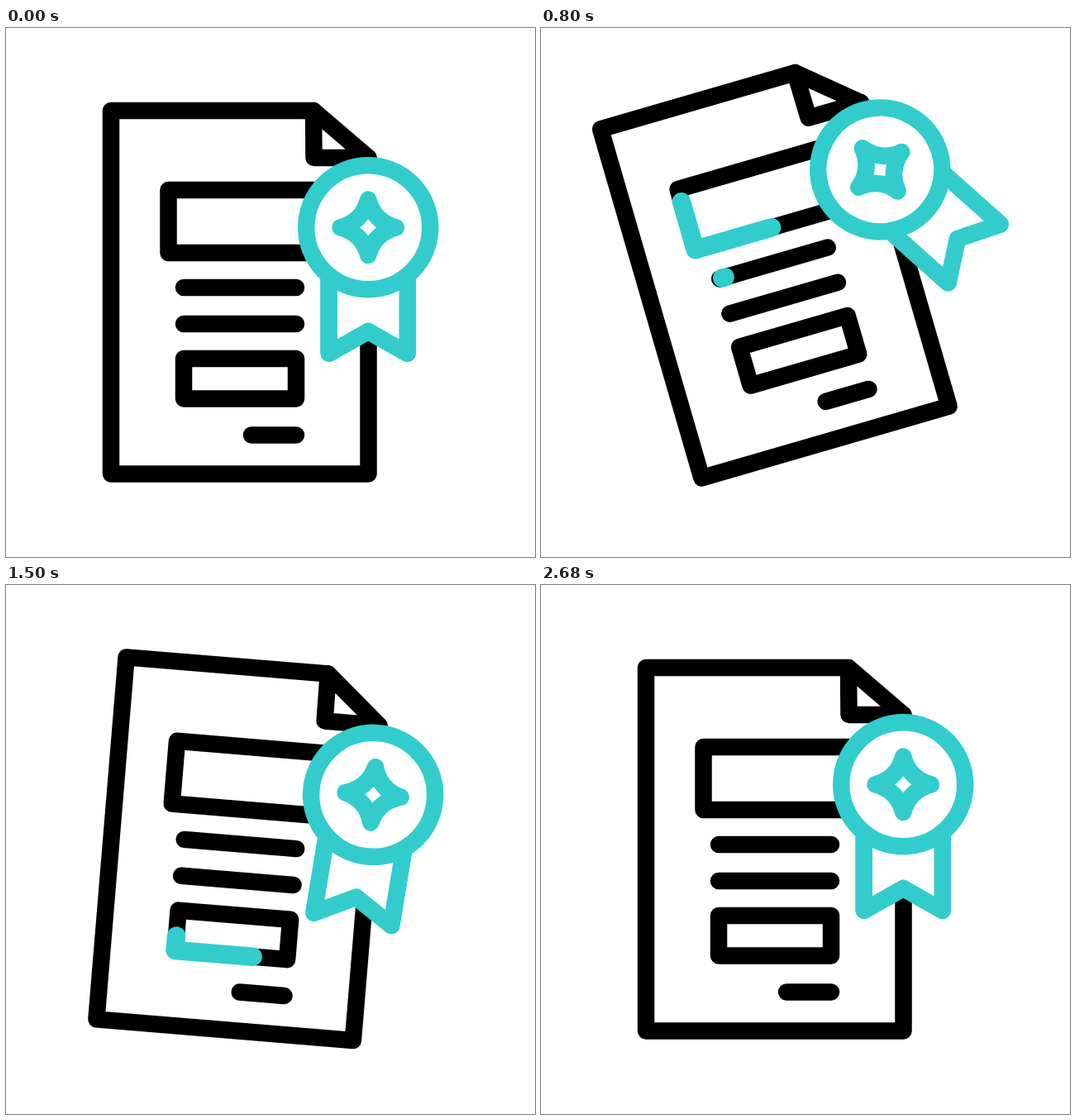
Animation, 640 px wide and 640 px high, one loop 2.82 s. Source, as an HTML page with a canvas:

```html
<!DOCTYPE html>
<html lang="en">
<head>
<meta charset="utf-8">
<title>Certificate</title>
<style>
  html, body { margin: 0; width: 100%; height: 100%; overflow: hidden; background: #fff; }
  canvas { display: block; width: 640px; height: 640px; }
</style>
</head>
<body>
<canvas id="stage" width="640" height="640"></canvas>
<script>
const ctx = document.getElementById('stage').getContext('2d');
const LOOP = 2820;
const REST = 2680;
const TEAL = '#33cccc';
const STROKE = 20.5;
const CENTER = { x: 282.5, y: 319.5 };
const MEDAL = { x: 438.2, y: 241.3 };

const progress = (t, from, span) => Math.min(1, Math.max(0, (t - from) / span));
const ease = s => s * s * (3 - 2 * s);

// Eases from rest to the first peak, then on to one further peak per beat, then to rest.
function swing(start, first, beat, ...peaks) {
  return t => [...peaks, 0].reduce((value, peak, i) => {
    const from = i ? first + (i - 1) * beat : start;
    const span = i ? beat : first - start;
    return value + (peak - (peaks[i - 1] || 0)) * ease(progress(t, from, span));
  }, 0);
}

const pageLift = swing(28, 690, 512, -39, 38.5, -24);
const pageTilt = swing(84, 820, 488, -16.2, 10.6, -6.4, 3.15);
const ribbonSwing = swing(165, 805, 465, -32.1, 13.2, -4.1);
const starTurn = swing(110, 800, 360, -23.3, 12.4);

// Boxes run from the top right, leftwards, down and back along the bottom.
const box = (left, top, right, bottom) =>
  [[right, top], [left, top], [left, bottom], [right, bottom]];
const row = (left, right, y) => [[left, y], [right, y]];

const fold = [[372, 100], [438.5, 157], [372.5, 157]];
const page = [...box(127, 100, 438.5, 539.5), fold[1], fold[0]];
const titleBox = box(196.5, 196, 372, 272);
const lowerBox = box(215, 400, 351, 448.5);
const lineOne = row(215, 351, 314);
const lineTwo = row(215, 351, 358);
const lineThree = row(297, 351, 492.5);
page[0] = fold[0];
page.pop();

// Each highlight has an even head and a tail that speeds up behind it.
const highlight = (points, start, headSpan, tailSpan) => ({ points, start, headSpan, tailSpan });
const lineHighlight = (points, start) => highlight(points, start, 220, 400);
const highlights = [
  highlight(titleBox, 75, 830, 1085),
  lineHighlight(lineOne, 740),
  lineHighlight(lineTwo, 887),
  highlight([...lowerBox, lowerBox[0]], 835, 815, 990),
  lineHighlight(lineThree, 1525)
];

const rotate = degrees => ctx.rotate(degrees * Math.PI / 180);

function strokeLine(points, closed = false) {
  ctx.beginPath();
  points.forEach(([x, y]) => ctx.lineTo(x, y));
  if (closed) ctx.closePath();
  ctx.stroke();
}

function pathLength(points) {
  return points.slice(1).reduce((sum, [x, y], i) =>
    sum + Math.hypot(x - points[i][0], y - points[i][1]), 0);
}

function drawHighlight({ points, start, headSpan, tailSpan }, t) {
  const length = pathLength(points);
  const head = length * progress(t, start + 50, headSpan);
  const tail = length * progress(t, start, tailSpan) ** 2;
  if (head - tail < 0.1) return;
  ctx.setLineDash([head - tail, length * 2]);
  ctx.lineDashOffset = -tail;
  strokeLine(points);
  ctx.setLineDash([]);
}

function drawPage() {
  ctx.strokeStyle = '#000';
  strokeLine(page);
  strokeLine(fold, true);
  strokeLine(lowerBox, true);
  [titleBox, lineOne, lineTwo, lineThree].forEach(points => strokeLine(points));
}

function drawRibbon() {
  const half = 47.5, top = 58, foot = 152.5, notch = 125.5;
  strokeLine([[-half, top], [-half, foot], [0, notch], [half, foot], [half, top]]);
  ctx.fill();
  ctx.stroke();
}

function drawStar() {
  const tip = 33.7, waist = 7;
  ctx.beginPath();
  ctx.moveTo(tip, 0);
  for (let i = 0; i < 4; i++) {
    ctx.quadraticCurveTo(waist, waist, 0, tip);
    rotate(90);
  }
  ctx.closePath();
  ctx.stroke();
}

function drawMedal(t) {
  ctx.translate(MEDAL.x, MEDAL.y);
  ctx.fillStyle = '#fff';

  ctx.save();
  rotate(ribbonSwing(t));
  drawRibbon();
  ctx.restore();

  ctx.beginPath();
  ctx.arc(0, 0, 75, 0, Math.PI * 2);
  ctx.fill();
  ctx.stroke();

  rotate(starTurn(t));
  drawStar();
}

function draw(t) {
  ctx.fillStyle = '#fff';
  ctx.fillRect(0, 0, 640, 640);
  ctx.save();
  ctx.translate(CENTER.x, CENTER.y + pageLift(t));
  rotate(pageTilt(t));
  ctx.translate(-CENTER.x, -CENTER.y);
  ctx.lineCap = ctx.lineJoin = 'round';
  ctx.lineWidth = STROKE;
  drawPage();
  ctx.strokeStyle = TEAL;
  ctx.lineWidth = STROKE + 2;
  highlights.forEach(item => drawHighlight(item, t));
  ctx.lineWidth = STROKE;
  drawMedal(t);
  ctx.restore();
}

const began = performance.now();
function tick() {
  const t = (performance.now() - began) % LOOP;
  draw(t < REST ? t : LOOP);
  requestAnimationFrame(tick);
}
tick();
</script>
</body>
</html>
```
